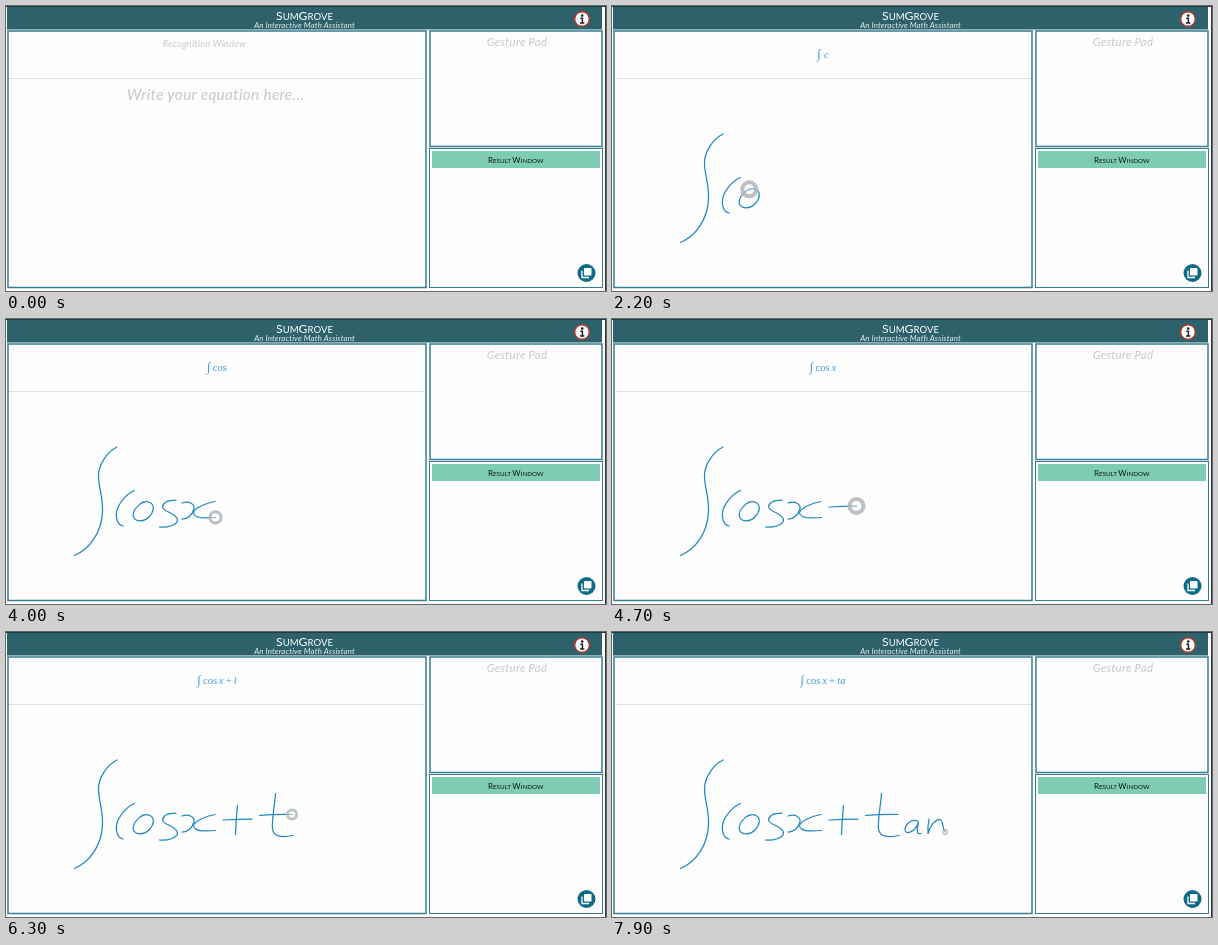
Animation, 600 px wide and 285 px high, one loop 8000 ms. Source, as an HTML page:

```html
<!DOCTYPE html>
<html lang="en">
<head>
<meta charset="utf-8">
<title>Math assistant</title>
<style>
  html, body { margin: 0; width: 100%; height: 100%; overflow: hidden; background: #fdfdfe; }
  svg { display: block; width: 600px; height: 285px; }
  text { text-anchor: middle; font-family: Lato, sans-serif; }
  .title { font-size: 9.6px; fill: #fff; }
  .title tspan { font-size: 12.2px; }
  .result { font-size: 6.3px; fill: #0c1513; }
  .result tspan { font-size: 8px; }
  .hint { font-style: italic; fill: #c6c8ca; letter-spacing: .3px; }
  .panel { fill: #fdfdfe; stroke: #377d90; }
  #math { font: 10.6px "Liberation Serif", serif; fill: #3f9ad4; }
  #math .var { font-style: italic; }
  #math .sign { font-size: 13px; }
  #ink { fill: none; stroke-linecap: round; stroke-linejoin: round; }
</style>
</head>
<body>
<svg viewBox="0 0 600 285">
  <rect width="600" height="285" fill="#fdfdfe"/>
  <rect x="1" width="595" height="23.5" fill="#2d626c"/>
  <path d="M0 .5H600" stroke="#1c3f47"/>
  <path d="M599.5 0V285" stroke="#30363a"/>
  <text class="title" x="298.5" y="14"><tspan>S</tspan>UM<tspan>G</tspan>ROVE</text>
  <text x="298.5" y="21.8" font-size="7.9" letter-spacing=".13" font-style="italic" fill="#e8f1f2">An Interactive Math Assistant</text>

  <circle cx="576" cy="13" r="7.3" fill="#fff" stroke="#b23c2c" stroke-width="1.4"/>
  <circle cx="576.2" cy="9.6" r="1.3" fill="#222"/>
  <path d="M574.3 12.3H576.4V16.6M574 16.9H578.4" fill="none" stroke="#222" stroke-width="1.5"/>

  <rect class="panel" x="2" y="25" width="418" height="256.5" stroke-width="1.5"/>
  <path d="M3 72.5H419" stroke="#dedfe1"/>
  <rect class="panel" x="424" y="25" width="172" height="115.5" stroke-width="1.5"/>
  <rect class="panel" x="423.5" y="142.5" width="173" height="139" stroke-width="1"/>
  <rect x="426" y="145" width="168" height="17" fill="#7ecdb3"/>
  <text class="result" x="509.7" y="156.8"><tspan>R</tspan>ESULT <tspan>W</tspan>INDOW</text>
  <text class="hint" x="511" y="40" font-size="11.4">Gesture Pad</text>

  <circle cx="580.5" cy="267" r="9" fill="#0d6b86"/>
  <path d="M576 264.5V271.5H583" fill="none" stroke="#fff" stroke-width="1.3"/>
  <rect x="578" y="262" width="7.5" height="7.5" rx=".8" fill="#fff"/>

  <g id="hints">
    <text class="hint" x="198.5" y="40.5" font-size="9.1">Recognition Window</text>
    <text class="hint" x="209.5" y="93.5" font-size="15.4">Write your equation here...</text>
  </g>
  <text id="math" x="211" y="51.5"></text>
  <g id="ink"></g>
  <g id="touch">
    <circle r="9" fill="#fff" fill-opacity=".35"/>
    <circle r="7" fill="none" stroke="#adafb0" stroke-opacity=".8" stroke-width="4"/>
  </g>
</svg>
<script>
const LOOP = 8000, FADE = 250, HINTS_END = 300, SETTLE = 2000;
const get = id => document.getElementById(id);

// [start ms, end ms, path]
const strokes = [
  [300, 850, "M111 128C101 133 92 146 92.5 158C93 170 97 178 96.5 192C96 213 84 230 68.5 236.5"],
  [1150, 1530, "M128.5 171.5C120 175 112 185 110.5 193C109.5 200 112 206 117 207"],
  [1750, 2220, "M137 183C131 186 126 193 127.5 198C129.5 203 138 203 143 198C148 193 149 186 144 183.5C141 182 138 182.5 135 184.5"],
  [2450, 2900, "M170 181C163 181 157 183 156.5 188C157 193 171 194 171.5 201C171.5 206 161 209 153.5 208"],
  [3050, 3280, "M176 184C183 181.5 189 185 188 190C186 196 182 200 176 200"],
  [3500, 3950, "M209 182.5C200 184 188 189 187.5 194C188 199 199 199.5 209.5 198.5"],
  [4450, 4715, "M217 188Q231 187 246 187"],
  [5000, 5300, "M231.5 173.5Q230 188 229.5 202.5"],
  [5620, 6020, "M269.5 161.5C268.5 175 265.5 189 266.5 197C267.5 205.5 277 205.5 287 203.5"],
  [6100, 6215, "M253.5 183.5Q270 182 286 182.5"],
  [6580, 7080, "M306 189.5C300 186 293 192 293 198C293.5 203.5 303 200 306.5 190.5C305 197 304 203 309 201.5"],
  [7300, 7735, "M317 187Q315.5 195 316 201.5C318 194 323 187.5 327.5 187.5C332 188 329.5 195 333 200"]
].map(([start, end, d]) => {
  const path = document.createElementNS("http://www.w3.org/2000/svg", "path");
  path.setAttribute("d", d);
  get("ink").append(path);
  return { start, end, path, length: path.getTotalLength() };
});

const span = (text, dx, cls = "") => `<tspan dx="${dx}" class="${cls}">${text}</tspan>`;
const integral = span("∫", 0, "sign");
const cos = integral + span("cos", 2.2);
const cosX = cos + span("x", 1.7, "var");
const sum = cosX + span("+", 2.2);
const readings = [
  [0, ""],
  [1200, integral],
  [2000, integral + span("c", 3, "var")],
  [2700, integral + span("(0", 2)],
  [3400, cos],
  [4300, cosX],
  [5150, cosX + span("−", 2.2)],
  [5600, sum],
  [6200, sum + span("l", 2.2, "var")],
  [6700, sum + span("t", 2.2, "var")],
  [7600, sum + span("ta", 2.2, "var")]
];

let shown = "";
function draw(t) {
  get("hints").style.display = t < HINTS_END ? "" : "none";
  const reading = readings.findLast(([at]) => at <= t)[1];
  if (reading !== shown) get("math").innerHTML = shown = reading;

  const fresh = t < SETTLE;
  get("ink").setAttribute("stroke", fresh ? "#167da9" : "#2088bf");
  get("ink").setAttribute("stroke-width", fresh ? 1.6 : 1.25);

  let touch = null;
  for (const { start, end, path, length } of strokes) {
    const done = length * Math.min(1, Math.max(0, (t - start) / (end - start)));
    path.style.display = done > 0 ? "" : "none";
    path.setAttribute("stroke-dasharray", `${done} ${length + 5}`);
    if (t >= start && t < end + FADE) {
      const { x, y } = path.getPointAtLength(done);
      const scale = 1 - Math.max(0, t - end) / FADE;
      touch = `translate(${x} ${y}) scale(${scale})`;
    }
  }
  get("touch").style.display = touch ? "" : "none";
  if (touch) get("touch").setAttribute("transform", touch);
}

const began = performance.now();
function tick() {
  draw((performance.now() - began) % LOOP);
  requestAnimationFrame(tick);
}
tick();
</script>
</body>
</html>
```
